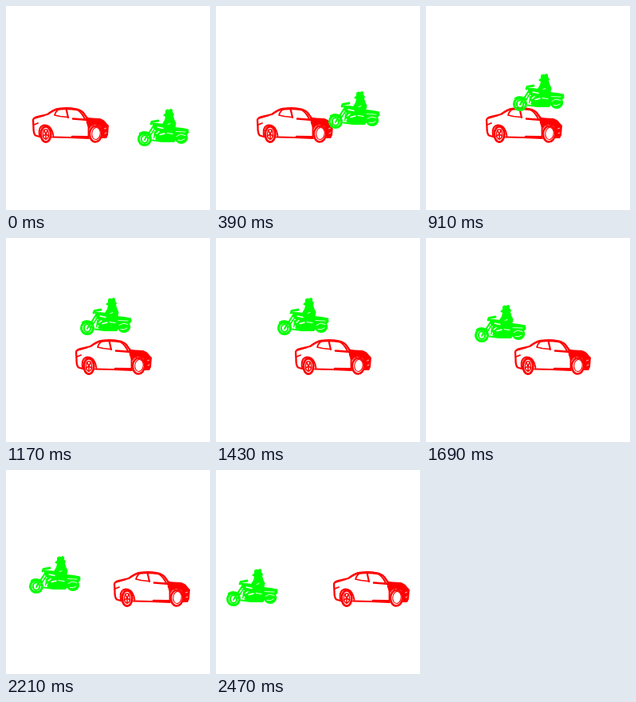
These frames come from a looping animation (256x256 px, 2600 ms). An HTML page with a canvas:

```html
<!DOCTYPE html>
<html lang="en">
<head>
<meta charset="utf-8">
<title>Car and motorbike</title>
<style>
html, body { margin: 0; width: 100%; height: 100%; overflow: hidden; background: #fff; }
canvas { display: block; width: 256px; height: 256px; }
</style>
</head>
<body>
<canvas id="stage" width="256" height="256"></canvas>
<script>
const ctx = document.getElementById('stage').getContext('2d');
const STEP = 130, STEPS = 20;
const RED = '#ff0000', GREEN = '#00ff00', WHITE = '#ffffff';

// Height of the bike's hop: [step, y]
const hop = [[0, 0], [3, -22], [5, -34], [9, -54], [10, -56], [11, -54],
  [13, -45], [15, -34], [17, -21], [19, -5]];

function hopAt(step) {
  const k = Math.max(1, hop.findIndex(p => p[0] >= step));
  const [a, ya] = hop[k - 1], [b, yb] = hop[k];
  return Math.round(ya + (yb - ya) * (step - a) / (b - a));
}

function line(d, color, width) {
  ctx.strokeStyle = color;
  ctx.lineWidth = width;
  ctx.stroke(new Path2D(d));
}

function fill(d, color) {
  ctx.fillStyle = color;
  ctx.fill(new Path2D(d));
}

function ring(x, y, rx, ry, color, width, tilt = 0) {
  ctx.strokeStyle = color;
  ctx.lineWidth = width;
  ctx.beginPath();
  ctx.ellipse(x, y, rx, ry, tilt, 0, Math.PI * 2);
  ctx.stroke();
}

function disc(x, y, rx, ry, color) {
  ctx.fillStyle = color;
  ctx.beginPath();
  ctx.ellipse(x, y, rx, ry, 0, 0, Math.PI * 2);
  ctx.fill();
}

function spokes(x, y, rx, ry, count, color, width) {
  for (let i = 0; i < count; i++) {
    const a = i / count * Math.PI * 2 + 0.3;
    line(`M${x} ${y}L${x + rx * Math.cos(a)} ${y + ry * Math.sin(a)}`, color, width);
  }
}

function drawCar() {
  // body outline and roof
  line('M42 164L37 162.5Q34.3 160 34.5 152L34 143Q34.5 140 40 138.8L52 136Q60 130 66 129Q77 127.3 88 129.3Q94 130.5 97 134L102 141', RED, 2.3);
  line('M63 130Q75 127.8 90 130.3', RED, 2.4);
  line('M36 141L48 137.5', RED, 1.6);
  line('M35 149L40 147', RED, 1.8);
  // windows
  line('M65 130.5Q62 133 61 137L68 138.5L77 139.5', RED, 1.7);
  line('M75.5 129L78 140', RED, 2.2);
  line('M84 141.5L103 143', RED, 2.5);
  line('M90 130.5Q96 135 99 142', RED, 2);
  // sill
  line('M58 164.5Q80 164.8 104 166', RED, 1.8);
  line('M83 164L103 164.3', RED, 2.6);
  // bonnet and nose
  fill('M100 139.5L108 140.5L118 141Q124 143 126 147L129 150L128 162L126 166L120 166L121 158L118 151L112 149L107 151L104 155L101 147Z', RED);
  line('M123.5 154L125.5 153.3M124 160L126 159', WHITE, 0.8);
  line('M103.5 144L103.5 163', RED, 1.8);
  // rear wheel
  line('M42 163Q40 151 48 149.5Q57 149 59.5 163', RED, 1.8);
  ring(50, 161, 6.3, 9.6, RED, 2.8);
  ring(50, 161, 3.6, 6.2, RED, 1.4);
  spokes(50, 161, 4, 6.5, 5, RED, 1.6);
  // front wheel
  disc(112.5, 160.5, 8, 10, WHITE);
  ring(112.5, 160.5, 7.6, 10, RED, 2.6, 0.06);
  ring(113, 160, 5.2, 7.6, RED, 1.1, 0.1);
}

function drawBike() {
  // rider
  fill('M200 131L202 129.5L205 130L207 128.8L209 130L209 133L211 136L210 138L211.5 143L213.5 147L212.5 152L196 152L196 148L199 143L200 139L197 137L200 134.5Z', GREEN);
  line('M203 148.5L206 147.5', WHITE, 0.9);
  // front wheel
  ring(174, 167, 7.6, 7.6, GREEN, 3);
  ring(174, 167, 4.2, 4.8, GREEN, 2.2);
  line('M174 168L175.5 165', GREEN, 1.8);
  line('M168 160Q174 156 181 161', GREEN, 2.4);
  // fork and handlebar
  line('M175 166L186 149', GREEN, 2.2);
  line('M179 166L189 150', GREEN, 1.6);
  line('M182 148L183 145.5L191 144', GREEN, 2.8);
  // tank, seat, tail
  fill('M183 147L190 147L198 148L203 151L212 152L221 153L229 154.5L229.5 159L226 163L211 162L199 159L189 158L185 153Z', GREEN);
  // engine and exhaust
  fill('M186 157L195 156L212 158L215 165L211 171L204 169L199 171L191 169L185 166Z', GREEN);
  line('M184 168.5L196 170L210 170', GREEN, 2);
  // rear wheel
  disc(220, 165.5, 8.2, 7.6, GREEN);
  line('M214 163.5L219 161L225 162.5', WHITE, 0.9);
  line('M216 168.5Q220 170 224 167', WHITE, 0.9);
  // gaps
  line('M190 152L197 153.5', WHITE, 1.3);
  line('M189 160L192 157.5M193 161.5L199 160', WHITE, 1.4);
  line('M202 159.5L209 160.5', WHITE, 1);
  line('M187.5 164L186.5 167', WHITE, 1.3);
  line('M213 157.5L225 158', WHITE, 0.8);
}

function place(x, y, draw) {
  ctx.save();
  ctx.translate(x, y);
  draw();
  ctx.restore();
}

function frame(now) {
  const step = Math.floor(now / STEP) % STEPS;
  ctx.fillStyle = WHITE;
  ctx.fillRect(0, 0, 256, 256);
  ctx.lineCap = ctx.lineJoin = 'round';
  place(step * 6, 0, drawCar);
  place(step * -8, hopAt(step), drawBike);
  requestAnimationFrame(frame);
}

frame(0);
</script>
</body>
</html>
```
